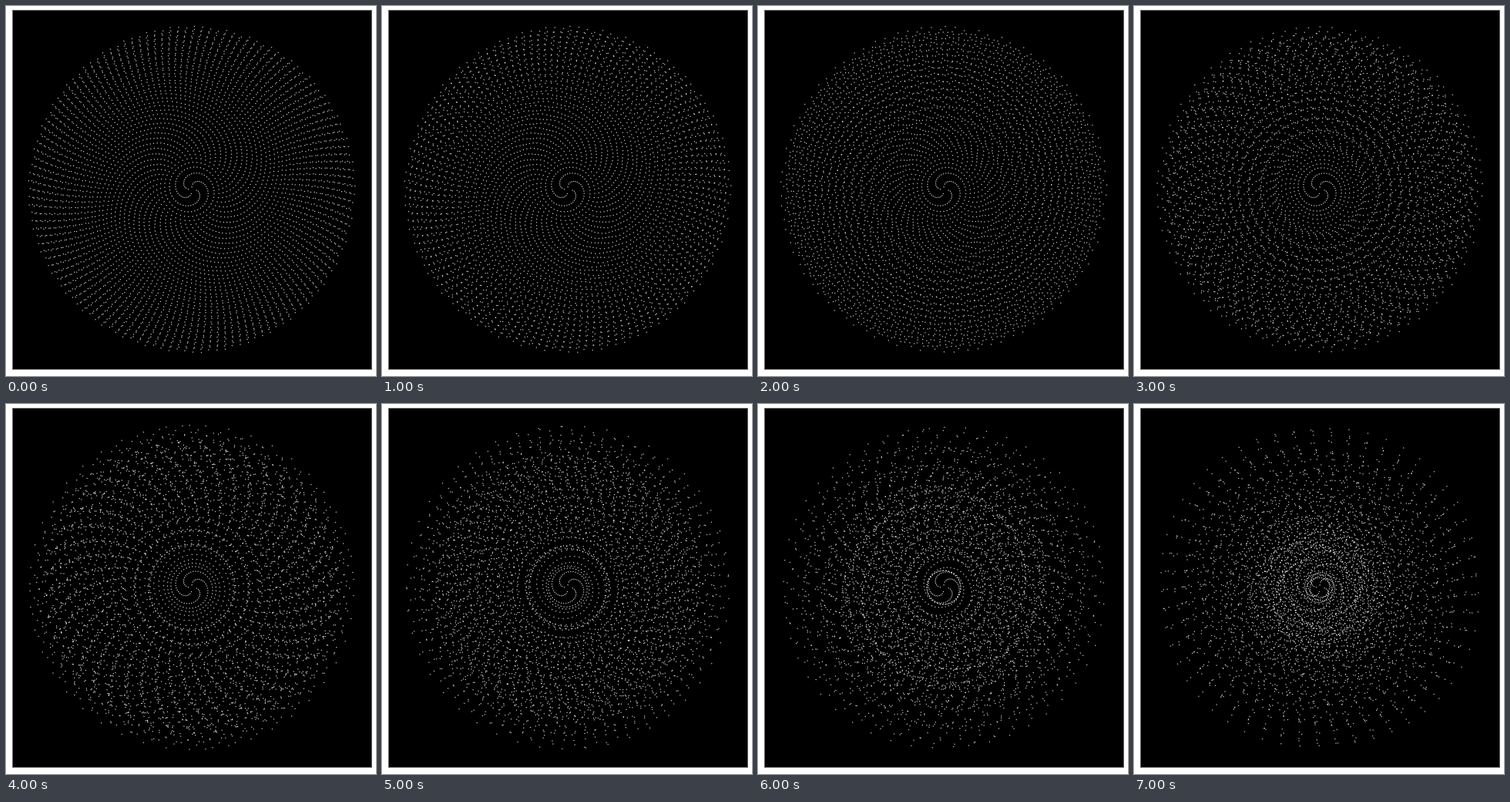
Recreate the animation shown at these times as an HTML page with a canvas. Size 480 px wide and 480 px high, loop 8 s.

```html
<!DOCTYPE html>
<html lang="en">
<head>
<meta charset="utf-8">
<title>Spiral with a growing epicycle</title>
<style>
  html, body { margin: 0; width: 100%; height: 100%; overflow: hidden; background: #fff; }
  canvas { display: block; width: 480px; height: 480px; }
</style>
</head>
<body>
<canvas id="stage" width="480" height="480"></canvas>
<script>
  const ctx = document.getElementById('stage').getContext('2d');
  const TURN = 2 * Math.PI;
  const COUNT = 4570;
  const RADIUS = 212;
  const CX = 241, CY = 238;
  const ANGLE = 0.24409 * TURN;       // turn from one dot to the next
  const ORBIT = ANGLE + TURN / 284;   // same for the small circle
  const STEP = 1000;
  const STEPS = 8;

  function drawPanel() {
    ctx.fillStyle = '#fff';
    ctx.fillRect(0, 0, 480, 480);
    ctx.fillStyle = '#000';
    ctx.fillRect(9, 6, 466, 465);
    ctx.strokeStyle = '#777';
    ctx.lineWidth = 1;
    ctx.strokeRect(8.5, 5.5, 466, 466);
  }

  // Each dot sits on a spiral plus a second circle of relative size "share"
  function drawDots(share) {
    ctx.fillStyle = 'rgba(255, 255, 255, 0.75)';
    for (let n = 1; n <= COUNT; n++) {
      const r = RADIUS * Math.sqrt(n / COUNT) / (1 + share);
      const x = Math.cos(n * ANGLE) + share * Math.cos(n * ORBIT);
      const y = Math.sin(n * ANGLE) + share * Math.sin(n * ORBIT);
      ctx.beginPath();
      ctx.arc(CX + r * x, CY - r * y, 0.75, 0, TURN);
      ctx.fill();
    }
  }

  let shown = -1;
  function tick() {
    const step = Math.floor(performance.now() / STEP) % STEPS;
    if (step !== shown) {
      shown = step;
      drawPanel();
      drawDots(2 ** (step - STEPS));
    }
    requestAnimationFrame(tick);
  }
  tick();
</script>
</body>
</html>
```
